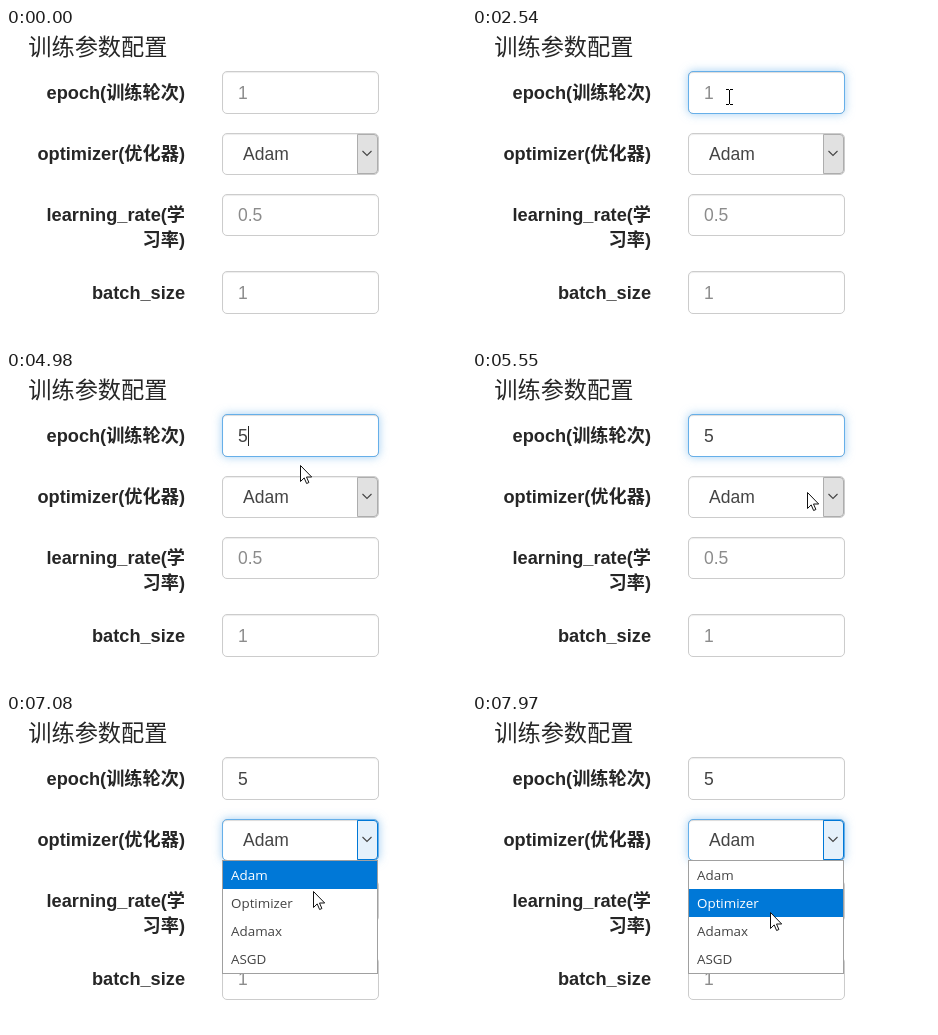
These frames come from a looping animation (460x315 px, 8000 ms). An HTML page:

```html
<!DOCTYPE html>
<html lang="zh">
<head>
<meta charset="utf-8">
<style>
html, body { margin: 0; width: 100%; height: 100%; overflow: hidden; background: #fff; }
#stage { position: relative; width: 460px; height: 315px; overflow: hidden; }
#stage svg { position: absolute; left: 0; top: 0; overflow: visible; }
text { font: 17.5px "Liberation Sans", "Noto Sans CJK SC", "Noto Sans CJK", sans-serif; fill: #262626; white-space: pre; }
.title { font: 23.2px "Noto Sans CJK SC", "Noto Sans CJK", sans-serif; }
.label { font-size: 18.2px; font-weight: bold; text-anchor: end; }
.value { fill: #444; }
.hint { fill: #8c8c8c; }
.field, .glow, .button, .list { position: absolute; box-sizing: border-box; }
.field { left: 216px; width: 157px; border: 1px solid #ccc; border-radius: 5px; box-shadow: inset 0 1px 1px rgba(0,0,0,.075); }
.glow { inset: -1px; border: 1px solid #66afe9; border-radius: 5px; opacity: 0;
  box-shadow: inset 0 1px 1px rgba(0,0,0,.075), 0 0 10px rgba(102,175,233,.6); }
.button { left: 351px; top: 106px; width: 21px; height: 40px; border: 1px solid #adadad; border-radius: 0 4px 4px 0; background: #e1e1e1; }
.button.hot { border-color: #0078d7; background: #e5f1fb; opacity: 0; }
.list { left: 216px; top: 146px; width: 156px; height: 114px; border: 1px solid #a0a0a0; background: #fff; opacity: 0; }
.list div { height: 28px; padding-left: 8px; font: 13.4px/29px "Open Sans", "Noto Sans", sans-serif; color: #444; }
.list .on { background: #0078d7; color: #fff; }
</style>
</head>
<body>
<div id="stage">
  <div class="field" style="top:43px;height:43px"><div class="glow" id="glowEpoch"></div></div>
  <div class="field" style="top:105px;height:42px"><div class="glow" id="glowSelect"></div></div>
  <div class="field" style="top:166px;height:42px"></div>
  <div class="field" style="top:243px;height:43px"></div>
  <div class="button"></div>
  <div class="button hot" id="hot"></div>
  <svg width="460" height="315">
    <text class="title" x="22.3" y="26.5">训练参数配置</text>
    <text class="label" x="179" y="71">epoch(训练轮次)</text>
    <text class="label" x="179" y="132">optimizer(优化器)</text>
    <text class="label" x="179" y="193">learning_rate(学</text>
    <text class="label" x="179" y="218">习率)</text>
    <text class="label" x="179" y="271">batch_size</text>
    <text id="epoch" x="232" y="71"></text>
    <text class="value" x="237" y="132">Adam</text>
    <text class="hint" x="232" y="193">0.5</text>
    <text class="hint" x="232" y="271">1</text>
    <path d="M356.5 123l4.5 4.5 4.5-4.5" fill="none" stroke="#444" stroke-width="1.1"/>
    <rect id="caret" y="55" width="1" height="20" fill="#222"/>
  </svg>
  <div class="list" id="list"><div>Adam</div><div>Optimizer</div><div>Adamax</div><div>ASGD</div></div>
  <svg width="460" height="315">
    <path id="beam" shape-rendering="crispEdges"
      d="M-3-8h3v1h-3zM1-8h3v1h-3zM0-7h1v14h-1zM-3 7h3v1h-3zM1 7h3v1h-3z"/>
    <path id="arrow" d="M.5.5v16l3.7-3.6 2.4 5.6 2.3-1-2.4-5.5h5.2z" fill="#fff" stroke="#111"/>
  </svg>
</div>
<script>
const LOOP = 8000, SHOW = 490, TYPED = 3890, OPEN = 5900, HOVER_LAG = 40;
const $ = id => document.getElementById(id);
const items = [...$('list').children];

// Pointer hot spot: time, x, y
const path = [
  [490, 360, 291], [1170, 305, 80], [1280, 300, 77], [1310, 300, 77],
  [1690, 257, 69], [4610, 257, 69], [5380, 335, 121], [6620, 335, 121],
  [7080, 307, 177], [7380, 298, 202], [7430, 298, 202], [7510, 298, 212],
  [7790, 298, 212], [7970, 298, 198], [8000, 298, 198]
];
// Caret visible: from, to, x
const carets = [[1970, 2540, 232], [3060, 3590, 232], [3890, 4120, 242], [4610, 5140, 242]];
const textAreas = [[43, 86], [166, 208], [243, 286]];

const slope = (i, k) => path[i + 1] && path[i]
  ? (path[i + 1][k] - path[i][k]) / (path[i + 1][0] - path[i][0]) : 0;

// Monotone tangent, zero at rests and turns
function tangent(i, k) {
  const a = slope(i - 1, k), b = slope(i, k);
  return a * b > 0 ? 2 * a * b / (a + b) : 0;
}

function pointer(t) {
  const i = Math.max(0, path.findIndex(p => p[0] > t) - 1);
  const d = path[i + 1][0] - path[i][0];
  const u = Math.max(0, (t - path[i][0]) / d), v = 1 - u;
  return [1, 2].map(k => Math.round(
    path[i][k] * v * v * (1 + 2 * u) + path[i + 1][k] * u * u * (3 - 2 * u) +
    d * u * v * (tangent(i, k) * v - tangent(i + 1, k) * u)));
}

function ramp(t, from, to) {
  const p = Math.min(1, Math.max(0, (t - from) / (to - from)));
  return p * p * (3 - 2 * p);
}

const show = (el, on) => { el.style.visibility = on ? 'visible' : 'hidden'; };

function render(t) {
  const [x, y] = pointer(t);
  const overText = t < OPEN && textAreas.some(([a, b]) => y >= a && y < b);
  for (const [id, on] of [['beam', overText], ['arrow', !overText]]) {
    show($(id), on && t >= SHOW);
    $(id).setAttribute('transform', `translate(${x} ${y})`);
  }

  const typed = t >= TYPED;
  $('epoch').textContent = typed ? '5' : '1';
  $('epoch').setAttribute('class', typed ? 'value' : 'hint');

  const caret = carets.find(c => t >= c[0] && t < c[1]);
  show($('caret'), caret);
  if (caret) $('caret').setAttribute('x', caret[2]);

  const moved = ramp(t, 5580, 5770);
  $('glowEpoch').style.opacity = ramp(t, 1970, 2160) * (1 - moved);
  $('glowSelect').style.opacity = $('hot').style.opacity = moved;
  $('list').style.opacity = ramp(t, OPEN, 6180);

  const hover = Math.max(0, Math.floor((pointer(t - HOVER_LAG)[1] - 147) / 28));
  items.forEach((el, i) => el.classList.toggle('on', i === (t < OPEN ? 0 : hover)));
}

const start = performance.now();
function tick() {
  render((performance.now() - start) % LOOP);
  requestAnimationFrame(tick);
}
tick();
</script>
</body>
</html>
```
